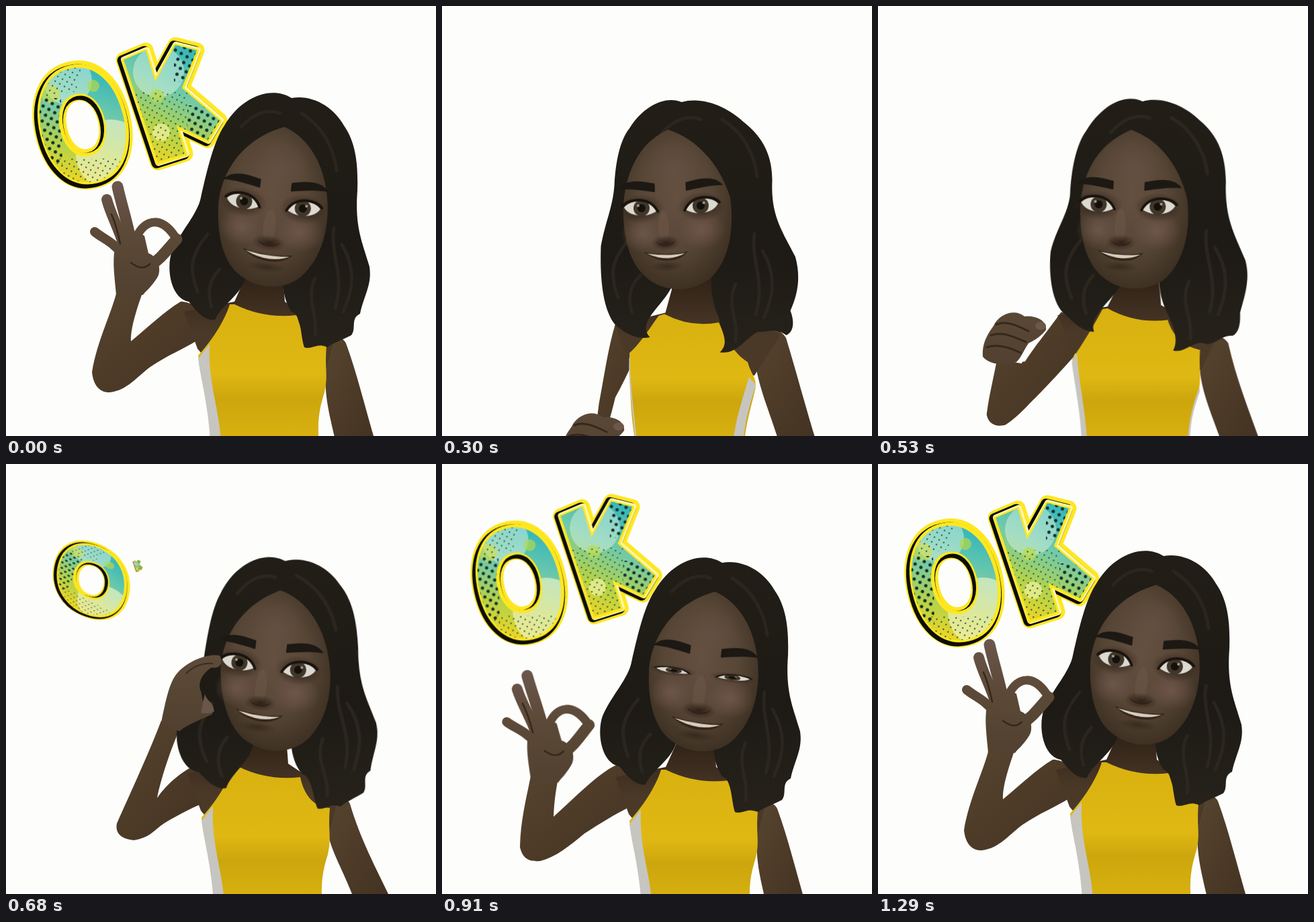
Animation, 640 px wide and 640 px high, one loop 1370 ms. Source, as an HTML page without scripts:

```html
<!DOCTYPE html>
<html lang="en">
<head>
<meta charset="utf-8">
<title>OK gesture</title>
<style>
html, body { margin: 0; width: 100%; height: 100%; overflow: hidden; background: #fdfdfc; }
svg { display: block; width: 100%; height: 100%; }

/* Each part lists its poses as --a to --f; poses must not leak into nested parts. */
@property --a { syntax: "*"; inherits: false; }
@property --b { syntax: "*"; inherits: false; }
@property --c { syntax: "*"; inherits: false; }
@property --d { syntax: "*"; inherits: false; }
@property --e { syntax: "*"; inherits: false; }
@property --f { syntax: "*"; inherits: false; }

.move, .morph, .pop, .fist, .side, .ring { animation: 1370ms linear infinite; }
.move { animation-name: move; }
.morph { animation-name: morph; }
.pop { animation-name: pop; }
.fist { animation-name: fist; }
.side { animation-name: side; }
.ring { animation-name: ring; }

@keyframes move {
  0% { transform: var(--f); animation-timing-function: step-end; }
  5.8% { transform: var(--a); animation-timing-function: step-end; }
  10.9% { transform: var(--a); animation-timing-function: steps(4); }
  32.8% { transform: var(--b); animation-timing-function: steps(3); }
  49.6% { transform: var(--c, var(--f)); animation-timing-function: steps(3); }
  66.4% { transform: var(--d, var(--f)); animation-timing-function: steps(3); }
  83.2% { transform: var(--e, var(--f)); animation-timing-function: steps(2); }
  94.1%, 100% { transform: var(--f); }
}
@keyframes morph {
  0% { d: var(--f); animation-timing-function: step-end; }
  5.8% { d: var(--a); animation-timing-function: step-end; }
  10.9% { d: var(--a); animation-timing-function: steps(4); }
  32.8% { d: var(--b); animation-timing-function: steps(3); }
  49.6% { d: var(--c, var(--f)); animation-timing-function: steps(3); }
  66.4% { d: var(--d, var(--f)); animation-timing-function: steps(3); }
  83.2% { d: var(--e, var(--f)); animation-timing-function: steps(2); }
  94.1%, 100% { d: var(--f); }
}
@keyframes pop {
  0% { transform: var(--f); animation-timing-function: step-end; }
  5.8% { transform: scale(0); animation-timing-function: step-end; }
  49.6% { transform: var(--c); animation-timing-function: step-end; }
  55.4% { transform: var(--big); animation-timing-function: step-end; }
  61.2% { transform: var(--back); animation-timing-function: step-end; }
  66.4% { transform: var(--d); animation-timing-function: steps(3); }
  83.2% { transform: var(--e, var(--f)); animation-timing-function: steps(2); }
  94.1%, 100% { transform: var(--f); }
}
@keyframes fist { 0%, 5.7% { opacity: 0; } 5.8%, 44.4% { opacity: 1; } 44.5%, 100% { opacity: 0; } }
@keyframes side { 0%, 44.4% { opacity: 0; } 44.5%, 55.3% { opacity: 1; } 55.4%, 100% { opacity: 0; } }
@keyframes ring { 0%, 5.7% { opacity: 1; } 5.8%, 55.3% { opacity: 0; } 55.4%, 100% { opacity: 1; } }

#letterO {
  --c: translate(127px, 173px) rotate(28deg) scale(.84, .56);
  --big: translate(113px, 177px) rotate(-4deg) scale(1.22);
  --back: translate(113px, 177px) rotate(0deg) scale(1.08);
  --d: translate(115px, 177px) rotate(0deg) scale(.97);
  --f: translate(114px, 177px) rotate(0deg) scale(1);
}
#letterK {
  --c: translate(196px, 152px) scale(.09);
  --big: translate(228px, 150px) scale(.75);
  --back: translate(246px, 147px) scale(1.18);
  --d: translate(245px, 144px) scale(.98);
  --e: translate(250px, 148px) scale(1);
  --f: translate(245px, 148px) scale(1);
}
#body {
  --a: translate(0, 0); --b: translate(0, 0); --c: translate(5px, 6px);
  --d: translate(-7px, 11px); --f: translate(0, 0);
}
#skin {
  --a: path("M331,400L386,400L392,445L498,488L450,560L275,540L255,520L250,490L325,465Z");
  --b: path("M365,400L418,400L422,445L510,490L480,540L305,540L285,500L266,460L340,448Z");
  --f: path("M358,400L412,400L415,440L490,490L477,540L310,540L285,510L265,455L340,440Z");
}
#farArm {
  --a: path("M440,475C465,462 490,470 498,488C520,540 532,600 548,650L496,650C482,600 465,570 455,535Z");
  --b: path("M480,500C490,485 515,485 526,500C535,550 552,600 567,650L508,650C490,600 480,570 479,535Z");
  --c: path("M474,500C485,484 500,484 507,500C523,554 545,594 569,644L514,644C495,594 480,574 473,539Z");
  --f: path("M476,500C485,490 500,490 506,502C522,545 535,600 550,650L491,650C482,610 473,580 476,540Z");
}
#top {
  --a: path("M322,467Q360,484 396,474C410,500 415,530 432,548C445,560 455,553 459,558C455,590 445,620 440,650L276,650C258,600 262,550 270,508C290,500 305,480 313,470Z");
  --b: path("M340,450Q380,474 428,468C435,490 455,505 478,512C476,540 482,550 474,580C465,605 460,620 460,650L300,650C300,600 298,560 288,525C300,505 320,470 332,452Z");
  --f: path("M340,444Q385,466 433,460C438,485 452,505 477,506C474,540 480,550 474,575C466,600 463,620 466,650L306,650C306,600 290,565 286,520C305,500 325,470 333,444Z");
}
#stripeL {
  --a: path("M270,520L270,520C262,560 270,610 276,650L276,650C270,610 262,560 270,520Z");
  --b: path("M290,520L287,530C292,570 300,610 300,650L305,650C302,600 296,560 290,520Z");
  --f: path("M303,503L286,525C291,560 302,600 304,650L320,650C318,600 300,560 303,503Z");
}
#stripeR {
  --a: path("M436,545L455,557C448,590 438,620 436,650L410,650C416,610 428,580 436,545Z");
  --b: path("M478,560L479,570C468,600 462,620 461,650L456,650C458,620 466,590 478,560Z");
  --f: path("M474,575L474,575C466,600 463,620 466,650L466,650C463,620 466,600 474,575Z");
}
#nearArm {
  --a: path("M275,760C276,740 276,730 276,720C277,700 277,680 277,665C277,640 278,610 280,560C280,550 280,540 279,530C280,525 278,515 275,510C270,495 260,485 250,486C249,520 249,580 251,640C252,680 253,720 254,760Z");
  --b: path("M150,598C152,612 155,625 160,645C166,660 180,662 190,655C210,635 222,620 236,605C255,580 272,556 288,532C296,515 302,500 300,485C290,470 280,460 266,460C245,500 235,515 216,545C208,560 200,580 192,600Z");
  --c: path("M231,382C215,425 185,490 165,535C162,550 172,558 190,560C215,556 220,545 235,535C260,520 280,510 296,504C302,495 308,485 305,472C302,455 295,447 285,447C265,455 240,475 225,497C230,470 245,425 258,396Z");
  --d: path("M133,460C125,500 117,530 116,570C120,588 130,592 146,591C170,585 190,568 212,550C235,535 260,520 278,511C284,505 290,495 290,478C285,460 275,447 262,447C235,458 205,490 166,525C167,500 170,480 175,460Z");
  --f: path("M165,424C158,455 135,500 128,545C130,565 140,576 155,575C180,572 195,552 215,537C240,520 265,510 284,498C292,490 300,480 298,465C290,450 275,440 260,440C235,455 215,475 186,499C185,480 195,450 204,424Z");
}
#head {
  transform-origin: 410px 320px;
  --a: translate(0, 0) rotate(0deg); --b: translate(0, 0) rotate(0deg);
  --c: translate(5px, 8px) rotate(-4.5deg); --d: translate(-8px, 10px) rotate(0deg);
  --e: translate(-4px, 0) rotate(-1.5deg); --f: translate(0, 0) rotate(0deg);
}
#hair {
  --a: path("M330,146C365,136 405,155 425,178C458,205 468,235 468,265C466,315 485,335 507,372C516,405 512,430 500,450C505,465 510,480 500,488C480,470 465,468 455,470C435,500 430,520 400,519C415,505 400,490 397,470C385,445 385,425 386,400L331,400C330,450 270,480 301,500C275,510 255,500 240,488C218,460 214,410 215,360C222,320 228,300 230,265C235,225 240,200 253,182C275,145 310,138 330,146Z");
  --b: path("M383,140C415,131 450,150 470,165C505,190 515,220 515,255C512,310 528,335 545,375C553,405 546,430 537,457C545,475 537,490 525,492C510,485 500,505 485,500C465,490 450,518 427,512C445,495 427,475 428,460C420,440 415,425 416,400L365,400C355,430 300,455 318,486C300,485 285,470 275,460C258,440 256,390 258,355C265,320 280,300 283,270C282,235 290,200 305,182C330,145 360,130 383,140Z");
  --f: path("M425,137C455,131 488,150 503,178C522,205 524,240 523,275C519,330 530,350 541,388C545,415 533,430 527,458C512,465 522,480 514,490C500,497 490,500 478,508C465,500 455,512 444,508C438,490 440,460 425,455C415,440 412,425 412,400L358,400C352,430 320,445 311,467C295,470 280,450 272,440C245,435 238,390 247,365C260,335 285,310 290,285C300,240 310,200 325,178C350,135 395,118 425,137Z");
}
#strands { --a: translate(-44px, 12px); --b: translate(-2px, 6px); --f: translate(0, 0); }
#face {
  --a: path("M312,187C355,200 390,235 408,285C415,330 412,375 385,405C355,435 305,432 280,405C255,380 247,340 248,300C250,260 268,205 312,187Z");
  --b: path("M361,181C400,195 435,230 450,285C455,330 445,375 420,400C395,422 350,422 325,400C300,380 290,340 292,295C295,250 310,205 361,181Z");
  --f: path("M414,180C450,195 474,235 478,285C482,330 470,375 440,402C415,424 375,422 350,402C325,385 314,345 316,300C318,255 345,200 414,180Z");
}
#features {
  --a: translate(319px, 304px) rotate(-5deg); --b: translate(363px, 296px) rotate(0deg);
  --c: translate(391px, 302px) rotate(7deg); --d: translate(389px, 309px) rotate(7deg);
  --e: translate(396px, 294px) rotate(5deg); --f: translate(398px, 297px) rotate(7deg);
}
#eyes {
  --a: translate(0, 0) scale(1); --b: translate(0, 0) scale(1);
  --c: translate(0, 0) scale(1); --d: translate(0, 4px) scale(1, .36);
  --f: translate(0, 0) scale(1);
}
#muzzle {
  --a: translate(-11px, -3px) scale(.84, .95); --b: translate(-10px, -2px) scale(.88, 1);
  --c: translate(-6px, -1px) scale(.95, 1); --d: translate(0, 0) scale(1.05, 1.04);
  --f: translate(0, 0) scale(1);
}
#hand {
  --a: translate(264px, 760px) rotate(0deg); --b: translate(170px, 600px) rotate(0deg);
  --c: translate(248px, 390px) rotate(0deg); --d: translate(153px, 471px) rotate(-3deg);
  --e: translate(180px, 428px) rotate(-2deg); --f: translate(184px, 426px) rotate(0deg);
}
</style>
</head>
<body>
<svg viewBox="0 0 640 640">
  <defs>
    <linearGradient id="skinTone" x1="0" y1="0" x2="1" y2="1">
      <stop offset="0" stop-color="#56452f"/><stop offset=".5" stop-color="#4d3b28"/><stop offset="1" stop-color="#433222"/>
    </linearGradient>
    <linearGradient id="neckTone" x1="0" y1="0" x2="0" y2="1">
      <stop offset="0" stop-color="#2f2117"/><stop offset=".6" stop-color="#4b3927"/>
    </linearGradient>
    <radialGradient id="faceTone" cx=".48" cy=".42" r=".62">
      <stop offset="0" stop-color="#655040"/><stop offset=".55" stop-color="#574636"/><stop offset="1" stop-color="#3a2e20"/>
    </radialGradient>
    <radialGradient id="blush">
      <stop offset="0" stop-color="#6f564c" stop-opacity=".9"/><stop offset="1" stop-color="#6f564c" stop-opacity="0"/>
    </radialGradient>
    <radialGradient id="shade">
      <stop offset="0" stop-color="#271a12" stop-opacity=".9"/><stop offset="1" stop-color="#271a12" stop-opacity="0"/>
    </radialGradient>
    <linearGradient id="handTone" gradientUnits="userSpaceOnUse" x1="0" y1="-160" x2="0" y2="0">
      <stop offset="0" stop-color="#6a564b"/><stop offset=".4" stop-color="#5d4a39"/><stop offset="1" stop-color="#524130"/>
    </linearGradient>
    <linearGradient id="cloth" x1="0" y1="0" x2="0" y2="1">
      <stop offset="0" stop-color="#d9b110"/><stop offset=".5" stop-color="#e0b813"/>
      <stop offset=".68" stop-color="#cca60d"/><stop offset="1" stop-color="#dab210"/>
    </linearGradient>
    <linearGradient id="hairTone" x1="0" y1="0" x2="0" y2="1">
      <stop offset="0" stop-color="#221e17"/><stop offset=".6" stop-color="#1d1a15"/><stop offset="1" stop-color="#26221b"/>
    </linearGradient>
    <linearGradient id="comic" x1=".7" y1="0" x2=".3" y2="1">
      <stop offset="0" stop-color="#2fb5bd"/><stop offset=".4" stop-color="#72caa9"/>
      <stop offset=".7" stop-color="#b3d24c"/><stop offset="1" stop-color="#f3d51f"/>
    </linearGradient>
    <pattern id="dots" width="10" height="10" patternUnits="userSpaceOnUse" patternTransform="rotate(30)">
      <circle cx="5" cy="5" r="2.5" fill="#14312a"/>
    </pattern>
    <pattern id="fineDots" width="8" height="8" patternUnits="userSpaceOnUse" patternTransform="rotate(30)">
      <circle cx="4" cy="4" r="1.2" fill="#28633c"/>
    </pattern>
    <path id="oShape" transform="rotate(-13)" clip-rule="evenodd" fill-rule="evenodd"
      d="M0,-86C40,-86 62,-48 62,0S40,86 0,86S-62,48 -62,0S-40,-86 0,-86ZM0,-47C-22,-47 -34,-25 -34,0S-22,47 0,47S34,25 34,0S22,-47 0,-47Z"/>
    <path id="kShape" d="M-70,-68L-37,-82L-23,-36L7,-90L39,-82L17,-26L73,22L55,52L9,30L22,72L-19,85Z"/>
    <clipPath id="oClip"><use href="#oShape"/></clipPath>
    <clipPath id="kClip"><use href="#kShape"/></clipPath>
    <g id="eye">
      <ellipse rx="36" ry="22" fill="url(#shade)"/>
      <path d="M-25,-3C-16,-15 12,-16 24,4C10,13 -16,13 -25,-3Z" fill="#dcd9d0"/>
      <circle cx="1" cy="-1" r="12" fill="#40362a"/>
      <circle cx="1" cy="-1" r="6" fill="#14100b"/>
      <circle cx="-4" cy="-5" r="2" fill="#a69c8c"/>
      <path d="M-27,-5C-16,-17 14,-18 25,5" fill="none" stroke="#19130d" stroke-width="4" stroke-linecap="round"/>
    </g>
    <path id="brow" d="M-77,-31C-65,-44 -45,-41 -24,-36L-24,-25C-45,-29 -62,-32 -77,-31Z" fill="#1c1813" stroke="#1c1813" stroke-width="2" stroke-linejoin="round"/>
  </defs>

  <g stroke-linejoin="round">
    <g id="letterO" class="pop">
      <use href="#oShape" stroke="#ffe720" stroke-width="21"/>
      <use href="#oShape" x="-1" y="2" stroke="#0d0d05" stroke-width="14"/>
      <use href="#oShape" x="1" y="-1" stroke="#ffe720" stroke-width="8"/>
      <g clip-path="url(#oClip)">
        <use href="#oShape" fill="url(#comic)"/>
        <circle cx="-22" cy="-66" r="36" fill="#e4f5df" opacity=".5"/>
        <circle cx="42" cy="44" r="52" fill="#f1f5c9" opacity=".65"/>
        <circle cx="16" cy="-58" r="9" fill="#b5d94a" opacity=".7"/>
        <circle cx="-48" cy="-46" r="14" fill="#d7df45" opacity=".6"/>
        <path d="M-75,-40L-32,-40L-30,60L-75,60Z" fill="url(#dots)"/>
        <path d="M-40,50L65,50L65,95L-40,95ZM-40,-90L0,-90L-10,-50L-60,-40Z" fill="url(#fineDots)"/>
      </g>
    </g>
    <g id="letterK" class="pop">
      <use href="#kShape" stroke="#ffe720" stroke-width="23"/>
      <use href="#kShape" x="-2" y="1" stroke="#0d0d05" stroke-width="15"/>
      <use href="#kShape" x="1" stroke="#fff8b0" stroke-width="10"/>
      <use href="#kShape" y="1" stroke="#ffe720" stroke-width="6"/>
      <g clip-path="url(#kClip)">
        <use href="#kShape" fill="url(#comic)"/>
        <circle cx="-18" cy="-50" r="38" fill="#dff3e4" opacity=".45"/>
        <circle cx="-14" cy="40" r="13" fill="#f2f2a2" opacity=".7"/>
        <circle cx="-20" cy="-14" r="10" fill="#b8dc55" opacity=".8"/>
        <path d="M5,-95H45V-35H5ZM25,0H80V60H25Z" fill="url(#dots)"/>
        <path d="M-60,-20H25V90H-40Z" fill="url(#fineDots)"/>
      </g>
    </g>
  </g>

  <path id="nearArm" class="morph" fill="url(#skinTone)"/>
  <g id="body" class="move">
    <path id="farArm" class="morph" fill="url(#skinTone)"/>
    <path id="skin" class="morph" fill="url(#neckTone)"/>
    <path id="top" class="morph" fill="url(#cloth)"/>
    <g fill="#c6c5c0">
      <path id="stripeL" class="morph"/>
      <path id="stripeR" class="morph"/>
    </g>
  </g>

  <g id="head" class="move">
    <path id="hair" class="morph" fill="url(#hairTone)"/>
    <g id="strands" class="move" fill="none" stroke="#332d24" stroke-width="5" stroke-linecap="round" opacity=".6">
      <path d="M350,180C368,160 390,152 408,160M440,160C470,178 488,210 492,245M488,330C482,370 505,400 490,450"/>
      <path d="M500,355C520,390 518,420 502,455M460,405C445,435 465,460 460,490M300,340C275,370 272,390 285,425M318,392C300,410 300,430 306,448"/>
    </g>
    <path id="face" class="morph" fill="url(#faceTone)"/>
  </g>

  <g id="features" class="move">
    <ellipse cy="-60" cx="6" rx="40" ry="38" fill="url(#blush)" opacity=".4"/>
    <ellipse cx="-44" cy="37" rx="32" ry="28" fill="url(#blush)"/>
    <ellipse cx="44" cy="35" rx="36" ry="29" fill="url(#blush)"/>
    <g id="eyes" class="move">
      <use href="#eye" x="-45"/>
      <use href="#eye" transform="translate(45) scale(-1,1)"/>
    </g>
    <use href="#brow"/>
    <use href="#brow" transform="scale(-1,1)"/>
    <g id="muzzle" class="move">
      <ellipse cx="-2" cy="32" rx="9" ry="26" fill="#70594a" opacity=".45"/>
      <ellipse cy="56" rx="25" ry="12" fill="url(#shade)"/>
      <path d="M-17,53C-10,60 10,60 17,53C12,64 -12,64 -17,53Z" fill="#32211a"/>
      <ellipse cy="92" rx="30" ry="8" fill="url(#shade)" opacity=".6"/>
      <path d="M-38,68C-18,74 20,75 38,70C22,89 -18,87 -38,68Z" fill="#35231a"/>
      <path d="M-33,71Q0,77 33,73Q3,87 -33,71Z" fill="#d5cfc0"/>
    </g>
  </g>

  <g id="hand" class="move" fill="url(#handTone)">
    <g class="fist">
      <path d="M-40,-8C-42,-35 -25,-50 -22,-58C-10,-75 10,-78 22,-68C38,-70 56,-62 54,-48C48,-40 40,-34 28,-28C20,-16 18,-8 10,0C-8,6 -30,4 -40,-8Z"/>
      <path d="M-20,-56C-5,-62 10,-55 28,-46M-28,-40C-10,-46 5,-38 24,-30M-34,-22C-18,-28 0,-22 16,-14" fill="none" stroke="#35281b" stroke-width="3" stroke-linecap="round"/>
      <ellipse cx="46" cy="-54" rx="8" ry="6" fill="#6c574a"/>
    </g>
    <g class="side">
      <path d="M-17,-5C-8,-50 -3,-68 8,-80C25,-98 52,-108 70,-105C76,-95 72,-85 58,-87C46,-80 36,-65 42,-52C44,-45 44,-38 46,-36C56,-42 66,-28 58,-17C42,-10 18,0 10,8Z"/>
      <path d="M48,-48C50,-38 60,-36 62,-22C56,-18 48,-18 42,-20Z" fill="#6a564a"/>
      <path d="M20,-78C32,-90 45,-94 60,-93" fill="none" stroke="#3a2c1e" stroke-width="2"/>
    </g>
    <g class="ring" fill="none" stroke="url(#handTone)" stroke-linecap="round">
      <path d="M-12,-58C-25,-75 -40,-80 -52,-90" stroke-width="14"/>
      <path d="M-8,-68C-18,-100 -28,-115 -34,-138" stroke-width="16"/>
      <path d="M2,-76C-5,-110 -12,-130 -18,-157" stroke-width="17"/>
      <path d="M10,-82C25,-112 48,-110 66,-85" stroke-width="13"/>
      <path d="M28,-38C45,-48 55,-62 70,-79" stroke-width="17"/>
      <path d="M-20,4C-22,-20 -26,-45 -22,-65C-10,-85 10,-92 22,-84L28,-58C45,-52 48,-30 40,-20C30,-5 22,0 20,4Z" fill="url(#handTone)" stroke="none"/>
      <path d="M-14,-72C-18,-92 -22,-105 -27,-116M2,-44C12,-36 22,-34 30,-42" stroke="#35281b" stroke-width="2.5"/>
    </g>
  </g>
</svg>
</body>
</html>
```
